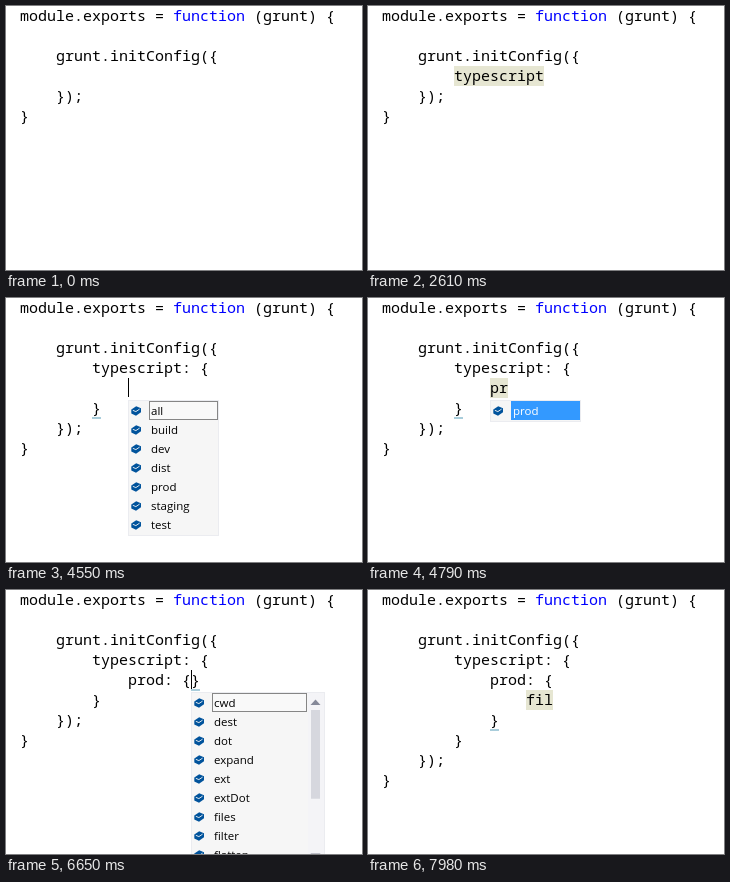
Recreate the animation shown at these times as an HTML page. Size 356 by 264 pixels, loop 8000 ms.

```html
<!DOCTYPE html>
<html lang="en">
<head>
<meta charset="utf-8">
<title>Editor completion</title>
<style>
  html, body { margin: 0; width: 100%; height: 100%; overflow: hidden; background: #fff; }
  svg { display: block; width: 356px; height: 264px; }
  .code { font: 15px "Noto Sans Mono", "DejaVu Sans Mono", monospace; }
  .item { font: 11.5px "Open Sans", "Noto Sans", sans-serif; fill: #000; }
</style>
</head>
<body>
<svg id="stage" viewBox="0 0 356 264"></svg>
<script>
const LOOP = 8000, CHAR = 9, LINE = 20, LEFT = 14, ROW = 19, VISIBLE = 9;

const LISTS = {
  tasks: { width: 122, items: ('bower clean coffee compass concat connect copy csslint cssmin ' +
    'handlebars htmlmin imagemin jasmine jshint less pkg qunit sass typescript uglify usemin watch').split(' ') },
  targets: { width: 90, items: 'all build dev dist prod staging test'.split(' ') },
  options: { width: 116, items: ('cwd dest dot expand ext extDot files filter flatten ' +
    'matchBase nonull options rename src').split(' ') }
};

const TS = '        typescript';
const block = (...inner) => [TS + ': {', ...inner, '        }'];
const prod = s => block('            ' + s);
const nested = s => block('            prod: {', s && '                ' + s, '            }');
const popup = (list, col, row, sel, more) => ({ list, col, row, sel, first: 0, ...more });

const tasks = popup('tasks', 8, 3, 'bower', { soft: true });
const tasksHit = popup('tasks', 8, 3, 'typescript', { first: 13 });
const targets = popup('targets', 12, 4, 'all', { soft: true });
const targetsHit = popup('targets', 12, 4, 'prod');
const options = popup('options', 16, 5, 'cwd', { soft: true });
const optionsHit = popup('options', 16, 5, 'files', { first: 2 });

// [time, changes]; positions are [column, row], marks are [column, row, length]
const steps = [
  [0, { body: [''], caret: null, mark: null, brace: null, error: null, menu: null }],
  [90, { caret: [8, 3] }],
  [420, { caret: null }],
  [980, { caret: [8, 3] }],
  [1280, { menu: tasks }],
  [1410, { caret: null }],
  [1670, { menu: tasksHit }],
  [1730, { body: ['        t'], mark: [8, 3, 1] }],
  [1830, { body: ['        ty'], mark: [8, 3, 2] }],
  [1990, { menu: null }],
  [2150, { body: [TS], mark: [8, 3, 10] }],
  [2180, { caret: [18, 3] }],
  [2610, { caret: null }],
  [2670, { body: [TS + ':'], mark: null, caret: [19, 3] }],
  [2900, { error: [4, 4] }],
  [2960, { caret: [20, 3] }],
  [3520, { caret: null }],
  [3750, { body: [TS + ': {}'], caret: [21, 3], brace: [21, 3] }],
  [3910, { error: null, menu: { ...targets, col: 21, row: 3 } }],
  [4030, { body: block(''), brace: [8, 5], caret: null, menu: null }],
  [4100, { caret: [12, 4] }],
  [4160, { menu: targets }],
  [4220, { caret: null }],
  [4550, { caret: [12, 4] }],
  [4580, { caret: null, menu: targetsHit }],
  [4630, { body: prod('p'), mark: [12, 4, 1] }],
  [4740, { body: prod('pr'), mark: [12, 4, 2], menu: { ...targetsHit, query: 'pr' } }],
  [4890, { body: prod('pro'), mark: [12, 4, 3] }],
  [5090, { menu: null }],
  [5250, { body: prod('prod'), mark: [12, 4, 4] }],
  [5610, { body: prod('prod:'), mark: null, caret: [17, 4] }],
  [5770, { error: [8, 5] }],
  [5870, { caret: null }],
  [6270, { caret: [18, 4] }],
  [6330, { caret: null }],
  [6590, { body: prod('prod: {}'), caret: [19, 4], brace: [19, 4], error: null }],
  [6650, { menu: { ...options, col: 19, row: 4 } }],
  [6810, { body: nested(''), brace: [12, 6], caret: null, menu: null }],
  [6900, { caret: [16, 5] }],
  [6960, { menu: options }],
  [7050, { caret: null }],
  [7350, { menu: optionsHit }],
  [7580, { body: nested('f'), mark: [16, 5, 1] }],
  [7690, { body: nested('fi'), mark: [16, 5, 2], menu: { ...optionsHit, first: 0, query: 'fi' } }],
  [7820, { body: nested('fil'), mark: [16, 5, 3] }],
  [7980, { menu: null }]
];

let last = {};
const states = steps.map(([at, change]) => ({ at, ...(last = { ...last, ...change }) }));

const px = col => LEFT + CHAR * col;
const rect = (x, y, w, h, fill, more = '') =>
  `<rect x="${x}" y="${y}" width="${w}" height="${h}" fill="${fill}" ${more}/>`;
const path = (d, fill, more = '') => `<path d="${d}" fill="${fill}" ${more}/>`;

function codeLine(line, row) {
  const text = line.trim();
  if (!text) return '';
  const indent = line.search(/\S/);
  const html = text.replace('function', '<tspan fill="#00f">function</tspan>');
  return `<text class="code" x="${px(indent)}" y="${row * LINE + 15}">${html}</text>`;
}

function icon(x, y) {
  return `<g transform="translate(${x} ${y})">` +
    path('M.3 3.6L5.2 .2L10 2.2V6.2L5 9.8L.3 7.6Z', '#00539c') +
    path('M1.8 4.3L4.9 5.6L8.6 3.1', 'none', 'stroke="#f6f6f6" stroke-width=".9"') + '</g>';
}

function scrollbar(x, y, count, first) {
  const track = 138, cx = x + 8.5;
  return rect(x + 1, y + 1, 16, ROW * VISIBLE + 1, '#f4f4f7') +
    path(`M${cx - 5} ${y + 13}h10l-5 -5.5z`, '#868999') +
    path(`M${cx - 5} ${y + 161.5}h10l-5 5.5z`, '#868999') +
    rect(x + 4, y + 18 + track * first / count, 9, track * VISIBLE / count, '#d6d7de');
}

function menuBox({ list, col, row, sel, first, soft, query = '' }) {
  const { width, items } = LISTS[list];
  const found = items.filter(s => s.startsWith(query));
  const shown = found.slice(first, first + VISIBLE);
  const scrolls = found.length > VISIBLE;
  const x = px(col), y = (row + 1) * LINE + 2, right = x + width;
  const w = width + (scrolls ? 18 : 1), h = shown.length * ROW + 3;
  let out = rect(x + .5, y + .5, w - 1, h - 1, '#f6f6f6', 'stroke="#ebecf0"');
  shown.forEach((name, i) => {
    const top = y + 1 + i * ROW, on = name === sel;
    if (on) out += soft
      ? rect(x + 21.5, top + .5, width - 22, ROW - 1, '#f9f9f9', 'stroke="#868686"')
      : rect(x + 21, top, width - 21, ROW, '#39f');
    out += icon(x + 3, top + 5) +
      `<text class="item" x="${x + 23}" y="${top + 14}"${on && !soft ? ' style="fill:#fff"' : ''}>${name}</text>`;
  });
  return out + (scrolls ? scrollbar(right, y, found.length, first) : '');
}

function draw({ body, caret, mark, brace, error, menu }) {
  const lines = ['module.exports = function (grunt) {', '', '    grunt.initConfig({',
    ...body, '    });', '}'];
  let out = '';
  if (mark) out += rect(px(mark[0]), mark[1] * LINE, mark[2] * CHAR, LINE, '#e6e6d2');
  out += lines.map(codeLine).join('');
  if (brace) out += rect(px(brace[0]), brace[1] * LINE + 19, CHAR, 2, '#a9cddb');
  if (error) out += path(`M${px(error[0])} ${error[1] * LINE + 19.5}l2 -2l2 2l2 -2l2 2`, 'none', 'stroke="#f00"');
  if (caret) out += rect(px(caret[0]), caret[1] * LINE, 1, 19, '#000');
  if (menu) out += menuBox(menu);
  return out;
}

const stage = document.getElementById('stage');
const start = performance.now();
let current = null;

function tick() {
  const t = (performance.now() - start) % LOOP;
  const state = states.findLast(s => s.at <= t);
  if (state !== current) {
    current = state;
    stage.innerHTML = draw(state);
  }
  requestAnimationFrame(tick);
}
tick();
</script>
</body>
</html>
```
